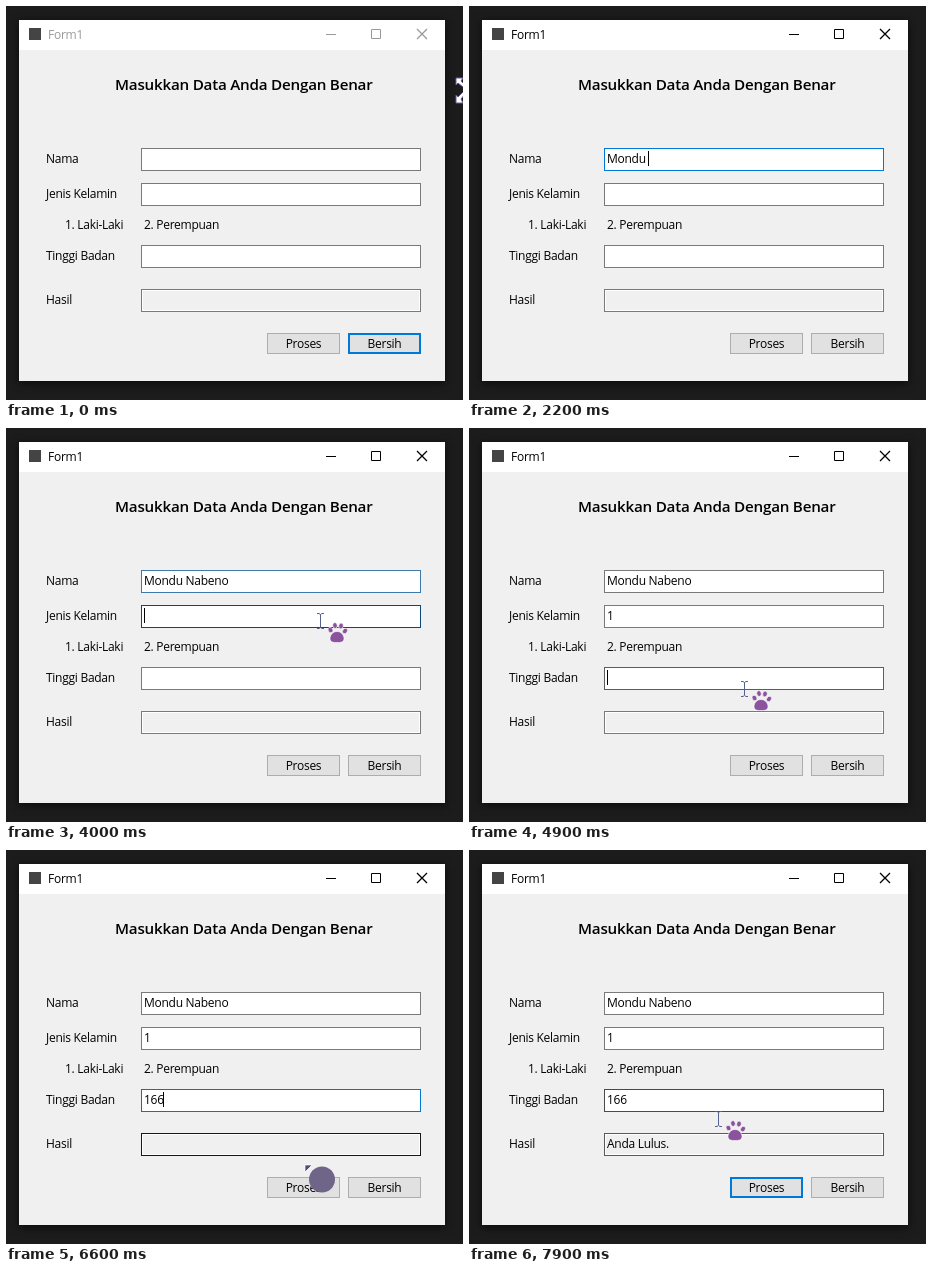
An HTML page that plays this animation: 457x394 px, repeating every 8 s.

```html
<!DOCTYPE html>
<html lang="id">
<head>
<meta charset="utf-8">
<title>Form</title>
<style>
html, body { margin: 0; height: 100%; overflow: hidden; background: #1c1c1c; }
svg { display: block; width: 457px; height: 394px; }
text { font: 12px "Open Sans", "Noto Sans", sans-serif; letter-spacing: -.28px; white-space: pre; }
.heading { font-size: 15.2px; font-weight: 600; letter-spacing: -.22px; }
.window { filter: drop-shadow(0 2px 5px rgba(0, 0, 0, .65)); }
</style>
</head>
<body>
<svg id="stage" viewBox="0 0 457 394"></svg>
<script>
const DURATION = 8000, STEP = 100, RESULT_AT = 7100;
const BLUE = '#0078d7', DARK = '#171717', GREY = '#7a7a7a';
const stage = document.getElementById('stage');

// Typing that speeds up towards the end
const typing = (count, from, to) => Array.from({ length: count },
  (_, i) => from + (to - from) * (1 - (1 - i / (count - 1)) ** 1.3));

const fields = [
  { label: 'Nama', y: 142, text: 'Mondu Nabeno', keys: typing(12, 1100, 3100), click: 800 },
  { label: 'Jenis Kelamin', y: 177, text: '1', keys: [4200], click: 3900 },
  { label: 'Tinggi Badan', y: 239, text: '166', keys: [5200, 6000, 6200], click: 4600, edge: '#5c5c5c' },
  { label: 'Hasil', y: 283, text: 'Anda Lulus.', keys: [], click: 7000, readOnly: true },
];
const allKeys = fields.flatMap(f => f.keys);

const moves = [
  { start: 0, end: 500, from: [450, 72], to: [325, 150] },
  { start: 3500, end: 3900, to: [314, 185] },
  { start: 4200, end: 4500, to: [275, 253] },
  { start: 6200, end: 6600, to: [299, 315] },
  { start: 6600, end: 6900, to: [297, 333] },
  { start: 7100, end: 7800, to: [249, 261] },
];
moves.forEach((m, i) => m.from ??= moves[i - 1].to);

// Typing hides the pointer until it moves again
function pointerAt(t) {
  const move = moves.findLast(m => m.start < t);
  if (!move || allKeys.some(k => k > move.start && k <= t)) return null;
  const k = Math.min(1, (t - move.start) / (move.end - move.start));
  const eased = k * k * (3 - 2 * k);
  return move.from.map((a, i) => Math.round(a + (move.to[i] - a) * eased));
}

const inside = (p, x, y, w, h) => p && p[0] >= x && p[0] < x + w && p[1] >= y && p[1] < y + h;
const overField = (p, f) => inside(p, 135, f.y, 280, 23);
const hasFocus = (f, t) => !f.readOnly && fields.findLast(g => g.click <= t) === f;

const rect = (x, y, w, h, fill, stroke = 'none', weight = 1) =>
  `<rect x="${x}" y="${y}" width="${w}" height="${h}" fill="${fill}" stroke="${stroke}" stroke-width="${weight}"/>`;
const label = (x, y, text, extra = '') => `<text x="${x}" y="${y}" ${extra}>${text}</text>`;

function borderAt(f, t) {
  if (hasFocus(f, t)) return f.edge ?? BLUE;
  if (overField(pointerAt(t), f)) return DARK;
  return f.readOnly && t >= RESULT_AT ? '#5a5a5a' : GREY;
}

function drawField(f, t) {
  const typed = f.keys.filter(k => k <= t);
  const shown = f.readOnly ? (t >= RESULT_AT ? f.text : '') : f.text.slice(0, typed.length);
  const border = `color-mix(in srgb, ${borderAt(f, t - STEP)}, ${borderAt(f, t - 2 * STEP)})`;
  const focused = hasFocus(f, t);
  const caretOn = focused && Math.floor((t - Math.max(f.click, ...typed)) / 500) % 2 === 0;
  return label(40, f.y + 15, f.label)
    + rect(135.5, f.y + .5, 279, 22, '#fff', border)
    + (f.readOnly ? rect(137, f.y + 2, 276, 19, '#f0f0f0') : '')
    + (focused && f.edge ? rect(414, f.y, 1, 23, BLUE) : '')
    + label(138, f.y + 15, shown, focused ? 'id="typed"' : '')
    + (caretOn ? `<rect id="caret" x="138" y="${f.y + 3}" width="1" height="15"/>` : '');
}

function drawButton(x, text, focused, hover, pressed) {
  const fill = pressed ? '#cce4f7' : hover ? '#e5f1fb' : '#e1e1e1';
  const box = focused ? rect(x + 1, 328, 71, 19, fill, BLUE, 2)
    : rect(x + .5, 327.5, 72, 20, fill, hover ? BLUE : '#adadad');
  return box + label(x + 36.5, 342, text, 'text-anchor="middle"');
}

const toe = (x, y, tilt) =>
  `<ellipse rx="2.3" ry="2.9" transform="translate(${x} ${y}) rotate(${tilt})"/>`;
const textPointer = `
  <path d="M-3 .5H-1L.5 1.5 2 .5H4M.5 1.5V14M-3 15.5H-1L.5 14.5 2 15.5H4" fill="none" stroke="#55608f"/>
  <g fill="#8b539d" stroke="#fff" stroke-width=".6">
    ${toe(10.5, 17, -30)}${toe(15, 12.5, -8)}${toe(21, 13, 12)}${toe(25, 18, 35)}
    <path d="M17 18.500C21 18.500 24 22 24 25.500C24 29.500 20 29.500 17 29.500S10 29.500 10 25.500C10 22 13 18.500 17 18.500Z"/>
  </g>`;
const arrowPointer = `
  <path d="M0 0H7L0 7Z" fill="#51487a" stroke="#fff" stroke-width=".7"/>
  <circle cx="17" cy="14.500" r="13" fill="#6e6588"/>`;
const resizePointer = `
  <path d="M0 0H7L5 3 9 7 7 9 2 5 0 7ZM0 17L2 19 7 14 9 16 5 21 7 25H0Z" fill="#fff" stroke="#655c96"/>`;

function drawPointer(t) {
  const p = t === 0 ? moves[0].from : pointerAt(t);
  if (!p) return '';
  const shape = t === 0 ? resizePointer
    : fields.some(f => overField(p, f)) ? textPointer : arrowPointer;
  return `<g transform="translate(${p})">${shape}</g>`;
}

function render(t) {
  const active = t >= fields[0].click, ink = active ? '#000' : '#999';
  const overProcess = inside(pointerAt(t), 261, 327, 73, 21);
  stage.innerHTML = `<g class="window">${rect(13, 14, 426, 361, '#f0f0f0')}</g>`
    + rect(13, 14, 426, 30, '#fff')
    + rect(23, 22, 12, 12, '#444')
    + label(42, 33, 'Form1', `fill="${ink}"`)
    + `<g fill="none" stroke="${ink}"><path d="M320 28.500H330M365.500 23.500H374.500V32.500H365.500Z"/>
       <path d="M411 23L421 33M421 23L411 33" stroke-width="1.3"/></g>`
    + label(109, 84, 'Masukkan Data Anda Dengan Benar', 'class="heading"')
    + label(59, 223, '1. Laki-Laki') + label(138, 223, '2. Perempuan')
    + fields.map(f => drawField(f, t)).join('')
    + drawButton(261, 'Proses', t >= 7000, overProcess, t === 7000)
    + drawButton(342, 'Bersih', !active, false, false)
    + drawPointer(t);
  const caret = document.getElementById('caret');
  if (caret) {
    const width = document.getElementById('typed').getComputedTextLength();
    caret.setAttribute('x', 138 + Math.floor(width));
  }
}

let shownTime = -1;
function tick() {
  const t = Math.floor(performance.now() % DURATION / STEP) * STEP;
  if (t !== shownTime) render(shownTime = t);
  requestAnimationFrame(tick);
}
tick();
</script>
</body>
</html>
```
